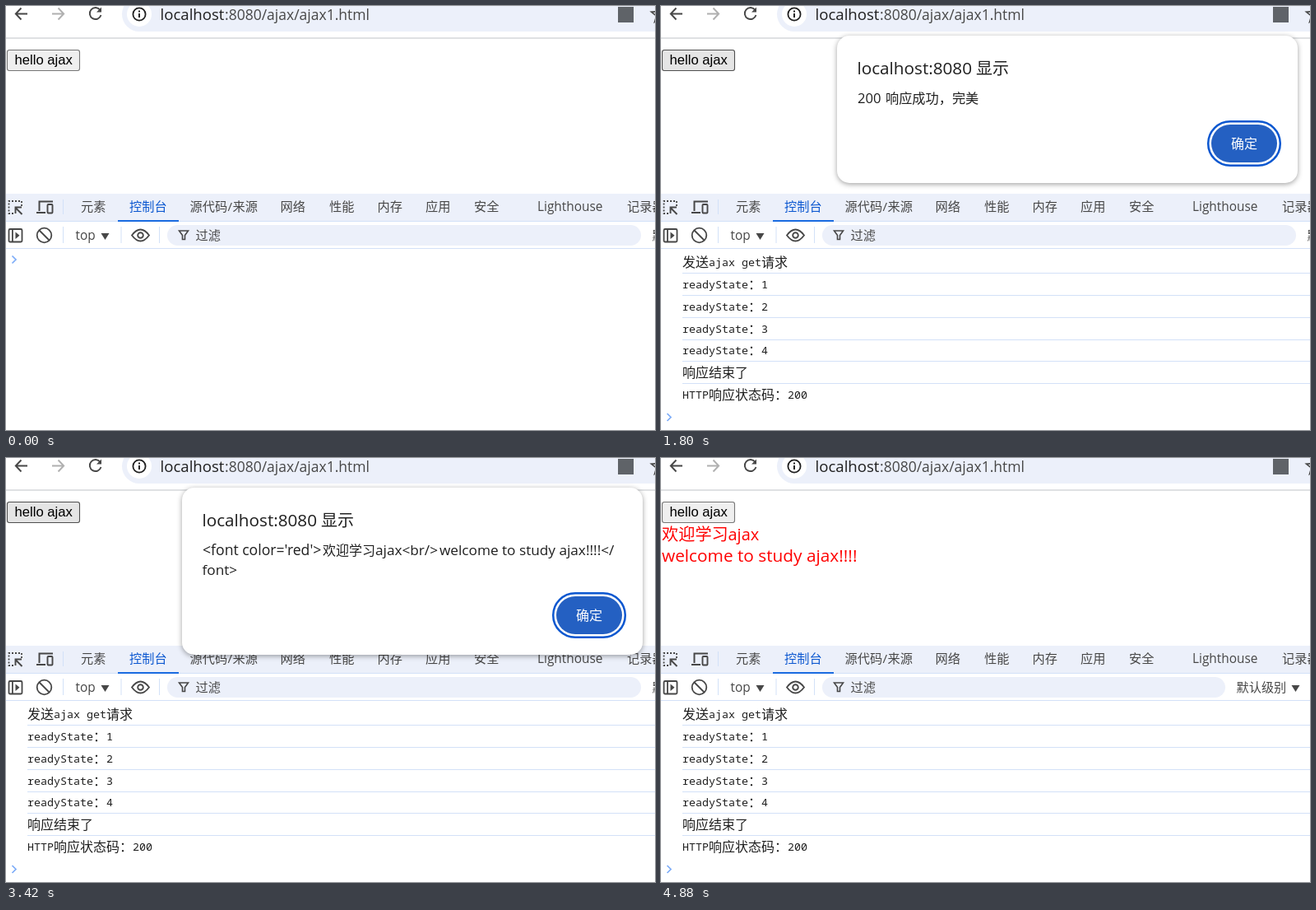
An HTML page with a canvas that plays this animation: 789 by 515 pixels, repeating every 6770 ms.

```html
<!DOCTYPE html>
<html lang="zh-CN">
<head>
<meta charset="utf-8">
<title>ajax</title>
<style>
html, body { margin: 0; width: 100%; height: 100%; overflow: hidden; background: #fff; }
canvas { display: block; }
</style>
</head>
<body>
<canvas id="stage" width="789" height="515"></canvas>
<script>
const W = 789, H = 515, LOOP = 6770;
const stage = document.getElementById('stage').getContext('2d');
const layerCanvas = document.createElement('canvas');
layerCanvas.width = W;
layerCanvas.height = H;
const layer = layerCanvas.getContext('2d');
let g = stage;

const UI = '"Open Sans", "Noto Sans CJK SC", "Noto Sans CJK", sans-serif';
const CJK = '"Noto Sans CJK SC", "Noto Sans CJK", sans-serif';
const MONO = '"Noto Sans Mono", "Liberation Mono", monospace';
const ARIAL = '"Liberation Sans", sans-serif';
const INK = '#1f1f1f', GREY = '#474747', BLUE = '#0b57d0', PALE = '#ecf0fa', RULE = '#d3e1f8';

function text(str, x, y, size, color = INK, font = UI, weight = 400) {
  g.font = `${weight} ${size}px ${font}`;
  g.fillStyle = color;
  g.fillText(str, x, y);
}

function rect(x, y, w, h, color) {
  g.fillStyle = color;
  g.fillRect(x, y, w, h);
}

function round(x, y, w, h, r, fill, stroke, width = 1) {
  g.beginPath();
  g.roundRect(x, y, w, h, r);
  if (fill) { g.fillStyle = fill; g.fill(); }
  if (stroke) { g.strokeStyle = stroke; g.lineWidth = width; g.stroke(); }
}

function path(d, color, width, fill) {
  const p = new Path2D(d);
  if (fill) { g.fillStyle = color; g.fill(p); return; }
  g.strokeStyle = color;
  g.lineWidth = width;
  g.stroke(p);
}

function circle(x, y, r, fill, stroke, width) {
  g.beginPath();
  g.arc(x, y, r, 0, Math.PI * 2);
  if (fill) { g.fillStyle = fill; g.fill(); }
  if (stroke) { g.strokeStyle = stroke; g.lineWidth = width; g.stroke(); }
}

function star(cx, cy, r) {
  g.beginPath();
  for (let i = 0; i < 10; i++) {
    const a = -Math.PI / 2 + i * Math.PI / 5, k = i % 2 ? r * 0.42 : r;
    g.lineTo(cx + k * Math.cos(a), cy + k * Math.sin(a));
  }
  g.closePath();
  g.strokeStyle = GREY;
  g.lineWidth = 1.6;
  g.stroke();
}

function toolbar() {
  path('M26 9.5H12M18.5 2.5L11.8 9.5L18.5 16.5', GREY, 1.9);
  path('M56 9.5H70M63.5 2.5L70.2 9.5L63.5 16.5', '#b0b0b0', 1.9);
  path('M114.5 5A7 7 0 1 0 115.5 11', GREY, 1.9);
  path('M116 1.5V7.5H110Z', GREY, 0, true);
  round(141, -11, 700, 42, 21, PALE);
  circle(162, 10, 15, '#fff');
  circle(162, 10, 7.6, null, INK, 1.8);
  rect(161, 9, 2, 5, INK);
  rect(161, 5.5, 2, 2, INK);
  text('localhost', 187.5, 17, 18.6);
  text(':8080/ajax/ajax1.html', 266, 17, 17.5, GREY);
  rect(744, 1, 19, 19, '#5f6368');
  star(795, 10.5, 11);
  rect(0, 38, W, 2, '#dfe1e3');
}

function pageButton(mode) {
  const [fill, edge] = { idle: ['#efefef', '#767676'], hover: ['#e5e5e5', '#4f4f4f'], down: ['#f5f5f5', '#8c8c8c'] }[mode];
  round(1.5, 53.5, 88, 25, 2.5, fill, edge, 1.1);
  text('hello ajax', 10.5, 71, 16.67, '#000', ARIAL);
}

const TABS = [['元素', 91], ['控制台', 150], ['网络', 333.5], ['性能', 393], ['内存', 451.5], ['应用', 510], ['安全', 569], ['记录器', 755]];

function devtools(wideLevel) {
  rect(0, 228, W, 33, PALE);
  rect(0, 261, W, 1, RULE);
  rect(136, 260, 74, 2, '#1a6be0');
  for (const [name, x] of TABS) text(name, x, 249, 15.2, name === '控制台' ? BLUE : GREY, CJK);
  text('源代码', 223.5, 249, 15.2, GREY, CJK);
  text('/', 269.5, 249, 15.2, GREY);
  text('来源', 275.5, 249, 15.2, GREY, CJK);
  text('Lighthouse', 646, 249, 15.4, GREY);

  g.setLineDash([2, 2]);
  path('M19 243V237H3.5V252H9', GREY, 1.8);
  g.setLineDash([]);
  path('M19.5 253L11.5 245M11.5 252V244.5H19', GREY, 1.9);
  path('M57 237.5H40.5V249M37 251H48', GREY, 2);
  round(50.5, 241, 6, 10.5, 1, PALE, GREY, 1.9);
  rect(69, 235, 1, 18, RULE);

  round(3.5, 271, 16, 15.5, 1.5, null, GREY, 1.8);
  rect(7, 271, 1.8, 15.5, GREY);
  path('M11.5 274.5L16.5 278.8L11.5 283Z', GREY, 0, true);
  circle(46.5, 278.5, 8.8, null, GREY, 1.8);
  path('M40.5 272.5L52.5 284.5', GREY, 1.8);
  for (const x of [69, 139.5, 186]) rect(x, 268, 1, 20, RULE);
  text('top', 84.5, 284, 15.4, GREY);
  path('M115.5 276H125.5L120.5 284Z', GREY, 0, true);
  path('M153 278.5Q163.5 264.5 174 278.5Q163.5 292.5 153 278.5Z', GREY, 1.8);
  circle(163.5, 278.5, 3.3, null, GREY, 1.9);

  round(196, 266, wideLevel ? 490 : 576, 25, 12.5, PALE);
  path('M210.5 273H221.5L217.5 278.5V283.5H214.5V278.5Z', GREY, 1.6);
  text('过滤', 230.5, 284, 15.2, GREY, CJK);
  text('默认级别', wideLevel ? 699.5 : 785.5, 284, 15.2, GREY, CJK);
  if (wideLevel) path('M766.5 276H776.5L771.5 284Z', GREY, 0, true);
  rect(0, 294, W, 1, RULE);
}

const LOGS = ['发送ajax get请求', 'readyState：1', 'readyState：2', 'readyState：3', 'readyState：4', '响应结束了', 'HTTP响应状态码：200'];

// Latin glyphs are half the width of the 16px Chinese ones.
function logLine(str, x, y) {
  for (const run of str.match(/[\x20-\x7e]+|[^\x20-\x7e]+/g)) {
    const latin = run.charCodeAt(0) < 127;
    if (latin) text(run, x, y - 1, 13.33, INK, MONO, 300);
    else text(run, x, y, 16, INK, CJK, 300);
    x += run.length * (latin ? 8 : 16);
  }
}

function consolePane(logged) {
  if (logged) LOGS.forEach((line, i) => {
    logLine(line, 26, Math.round(317.4 + 26.72 * i));
    if (i < LOGS.length - 1) rect(26, Math.round(324 + 26.85 * i), W, 1, RULE);
  });
  const y = logged ? 499.5 : 308;
  path(`M7.5 ${y - 4.5}L12 ${y}L7.5 ${y + 4.5}`, '#7cacf8', 1.7);
}

function okButton(cy, fill, ring, dx) {
  if (ring) round(665.2 + dx, cy - 26.8, 87.6, 53.6, 26.8, '#fff', BLUE, 2.5);
  round(669 + dx, cy - 23, 80, 46, 23, fill);
  text('确定', 693 + dx, cy + 6, 16, '#fff', CJK);
}

function dialog({ second = false, hover = false, ring = true, alpha = 1, dy = 0, grow = 0, clipTop = 0 }) {
  const bottom = second ? 239 : 215;
  g = layer;
  g.clearRect(0, 0, W, H);
  g.save();
  g.translate(0, dy);
  g.shadowColor = 'rgba(0,0,0,.38)';
  g.shadowBlur = 6;
  g.shadowOffsetY = 1.5;
  round(214 - grow, 36, 560 + 2 * grow, bottom - 36, 15, '#fff');
  g.shadowColor = 'transparent';
  text('localhost:8080', 238.5, 82.5, 20.7);
  text('显示', 383, 83, 20, INK, CJK);
  if (second) {
    text("<font color='red'>", 239, 118, 17.6);
    text('欢迎学习', 385, 118, 16, INK, CJK);
    text('ajax<br/>', 449, 118, 17.2);
    text('welcome to study ajax!!!!</', 527, 118, 17.2);
    text('font>', 238.5, 142, 17.2);
  } else {
    text('200', 239, 118, 16.6);
    text('响应成功，完美', 273, 118, 16.2, INK, CJK);
  }
  okButton(second ? 191 : 167, hover ? '#2460c2' : '#0c4fbc', ring, grow / 2);
  g.restore();
  g = stage;
  g.save();
  g.beginPath();
  g.rect(0, clipTop, W, H);
  g.clip();
  g.globalAlpha = alpha;
  g.drawImage(layerCanvas, 0, 0);
  g.restore();
}

function result() {
  text('欢迎学习', 1, 100, 20.2, '#f00', CJK);
  text('ajax', 81.5, 100, 20, '#f00');
  text('welcome to study ajax!!!!', 1, 126, 20.8, '#f00');
}

function dialogs(t) {
  if (t < 630 || t >= 4880) return;
  if (t < 720) dialog({ alpha: 0.5, dy: -11, grow: 3 });
  else if (t < 810) dialog({ alpha: 0.92, dy: -2 });
  else if (t < 2610) dialog({ hover: t >= 1800 });
  else if (t < 2700) {
    dialog({ hover: true, ring: false, alpha: 0.7, dy: -12 });
    dialog({ second: true, alpha: 0.5, dy: -11.5, grow: 3 });
  }
  else if (t < 4700) dialog({ second: true, hover: t >= 3330 });
  else if (t < 4790) dialog({ second: true, hover: true, clipTop: 40 });
  else dialog({ second: true, hover: true, ring: false, alpha: 0.4, dy: -12 });
}

function draw(t) {
  rect(0, 0, W, H, '#fff');
  toolbar();
  pageButton(t < 360 || t >= 4880 ? 'idle' : t >= 540 && t < 630 ? 'down' : 'hover');
  if (t >= 4880) result();
  devtools(t >= 4880);
  consolePane(t >= 630);
  dialogs(t);
}

const start = performance.now();
function tick() {
  draw((performance.now() - start) % LOOP);
  requestAnimationFrame(tick);
}
tick();
</script>
</body>
</html>
```
